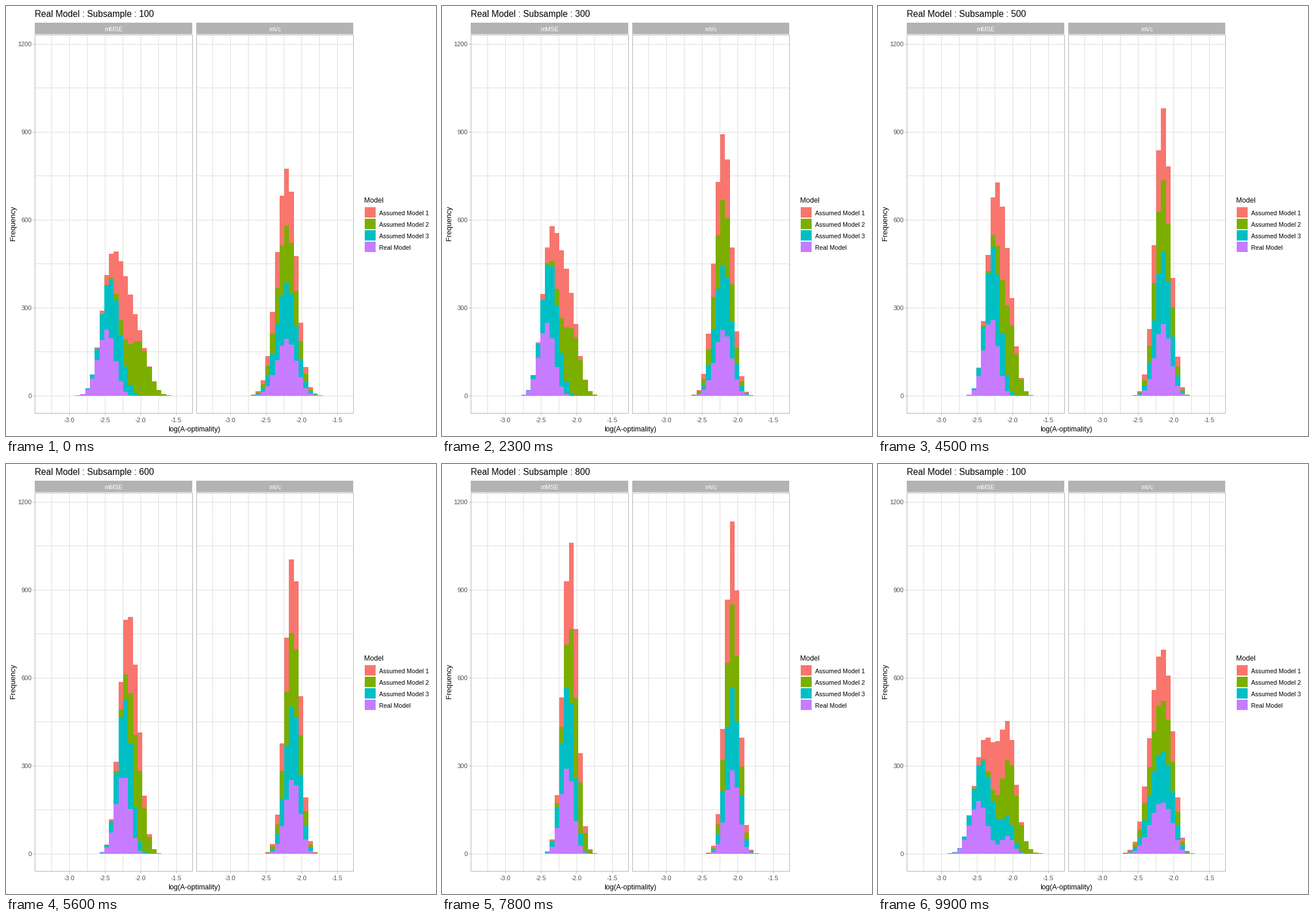
A matplotlib script that plays this animation: 748 px wide and 748 px high, repeating every 10000 ms.

```python
import numpy as np
import matplotlib.pyplot as plt
from matplotlib.animation import FuncAnimation
from matplotlib.collections import PolyCollection
from matplotlib.patches import Rectangle

plt.rcParams["font.family"] = "Liberation Sans"

SIZE, BINS, RUNS, SAMPLES = 748, 30, 1000, 9
BASE, UNIT = 678, 0.51            # pixel row of zero, pixels per count
EDGES = 62.95 + 8.297 * np.arange(BINS + 1)
SHIFT = 280.2                     # second panel relative to the first
GREY, GRID, TICK = "#B3B3B3", "#DEDEDE", "#4D4D4D"
COLORS = ["#C77CFF", "#00BFC4", "#7CAE00", "#F8766D"]
SKEW = 0.07                       # left tails are a little longer

# Mean and spread, in bins, at subsample 100, 200 and 900;
# between 200 and 900 both change evenly.
KEYS = [0, 1, 8]
REAL = (13.42, 13.42, 19.46), (1.77, 1.65, 1.31)
ASSUMED_3 = (14.95, 14.80, 19.50), (1.88, 1.67, 1.33)
ASSUMED_2 = (20.00, 19.35, 20.16), (2.14, 1.87, 1.33)
ASSUMED_1 = (17.06, 17.05, 19.90), (1.83, 1.80, 1.28)
SHARED = (17.38, 17.15, 19.83), (2.06, 1.85, 1.33)
PANELS = [[REAL, ASSUMED_3, ASSUMED_2, ASSUMED_1], [SHARED] * 4]


def histogram(model, sample):
    """Counts per bin of a bell curve, wider on the left than on the right."""
    mean, spread = (np.interp(sample, KEYS, values) for values in model)
    d = np.arange(BINS) + 0.5 - (mean + 1.6 * SKEW * spread)
    side = spread * np.where(d < 0, 1 + SKEW, 1 - SKEW)
    density = np.exp(-0.5 * (d / side) ** 2)
    return RUNS * density / density.sum()


def stacked(sample):
    return np.array([np.cumsum([histogram(m, sample) for m in models], axis=0)
                     for models in PANELS])


STATES = [stacked(s) for s in range(SAMPLES)]
# The first two moves take six frames, the others five; eleven apart after that.
STARTS = [6, 18] + list(range(30, 97, 11))
STEPS = [6, 6] + [5] * 7

fig = plt.figure(figsize=(SIZE / 100, SIZE / 100), dpi=100, facecolor="white")
ax = fig.add_axes([0, 0, 1, 1])
ax.set(xlim=(0, SIZE), ylim=(SIZE, 0))
ax.axis("off")


def box(x, y, w, h, color, z=1):
    ax.add_patch(Rectangle((x, y), w, h, fc=color, lw=0, aa=False, zorder=z))


def label(x, y, text, px, color="black", **kw):
    return ax.text(x, y, text, fontsize=px * 0.72, color=color, zorder=6, **kw)


def row_of(count):
    return int(BASE - UNIT * count)


def draw_panel(dx, name):
    left, right, top, bottom = round(50.4 + dx), round(324.2 + dx), 50, 708
    width, height = right - left + 1, bottom - top + 1
    for count in range(0, 1201, 150):
        box(left, row_of(count), width, 1, GRID)
    for value in np.arange(-3.25, -1.4, 0.25):
        x = 109.9 + 123.8 * (value + 3) + dx
        box(round(x), top, 1, height, GRID)
        if value % 0.5 == 0:
            box(round(x), bottom + 1, 1, 3, GREY)
            label(x, 724, f"{value:.1f}", 11, TICK, ha="center")
    for x in (left, right):
        box(x, top, 1, height, GREY, 4)
    for y in (top, bottom):
        box(left, y, width, 1, GREY, 4)
    box(left, 29, width - 1, 20, GREY, 4)
    label(left + width / 2, 44, name, 10.6, "white", ha="center")


def draw_legend():
    label(623, 342, "Model", 12.4)
    names = [f"Assumed Model {i}" for i in (1, 2, 3)] + ["Real Model"]
    for i, (name, color) in enumerate(zip(names, COLORS[::-1])):
        box(624, 350 + 20 * i, 19, 18, color)
        label(649, 364 + 20 * i, name, 10.75)


draw_panel(0, "mMSE")
draw_panel(SHIFT, "mVc")
for count in range(0, 1201, 300):
    box(47, row_of(count), 3, 1, GREY)
    label(45, row_of(count) + 4, str(count), 11, TICK, ha="right")
label(327, 740, "log(A-optimality)", 12.5, ha="center")
label(13.5, 378, "Frequency", 12.8, rotation=90, ha="center", va="center")
draw_legend()
title = label(50, 19, "", 15.5)

# Taller stacks go behind, so each model shows only its own share.
bars = []
for panel in range(2):
    for level, color in enumerate(COLORS):
        coll = PolyCollection([], facecolors=color, linewidths=0,
                              antialiaseds=False, zorder=3 - 0.1 * level)
        ax.add_collection(coll, autolim=False)
        bars.append((panel, level, coll))


def bar_shapes(tops, dx):
    cols = np.round(EDGES + dx)
    rows = np.round(BASE - UNIT * tops)
    return [[(a, BASE), (a, y), (b, y), (b, BASE)]
            for a, b, y in zip(cols[:-1], cols[1:], rows) if y < BASE]


def update(frame):
    k, p = 0, 0.0
    for i, (start, steps) in enumerate(zip(STARTS, STEPS)):
        if frame >= start:
            k, p = i, min(1, (frame - start + 1) / steps)
    nxt = (k + 1) % SAMPLES
    tops = (1 - p) * STATES[k] + p * STATES[nxt]
    for panel, level, coll in bars:
        coll.set_verts(bar_shapes(tops[panel, level], SHIFT * panel))
    near = nxt if p >= 0.5 else k
    title.set_text(f"Real Model : Subsample : {100 * (near + 1)}")
    return [title]


anim = FuncAnimation(fig, update, frames=100, interval=100, repeat=True,
                     repeat_delay=0, blit=False)
plt.show()
```
